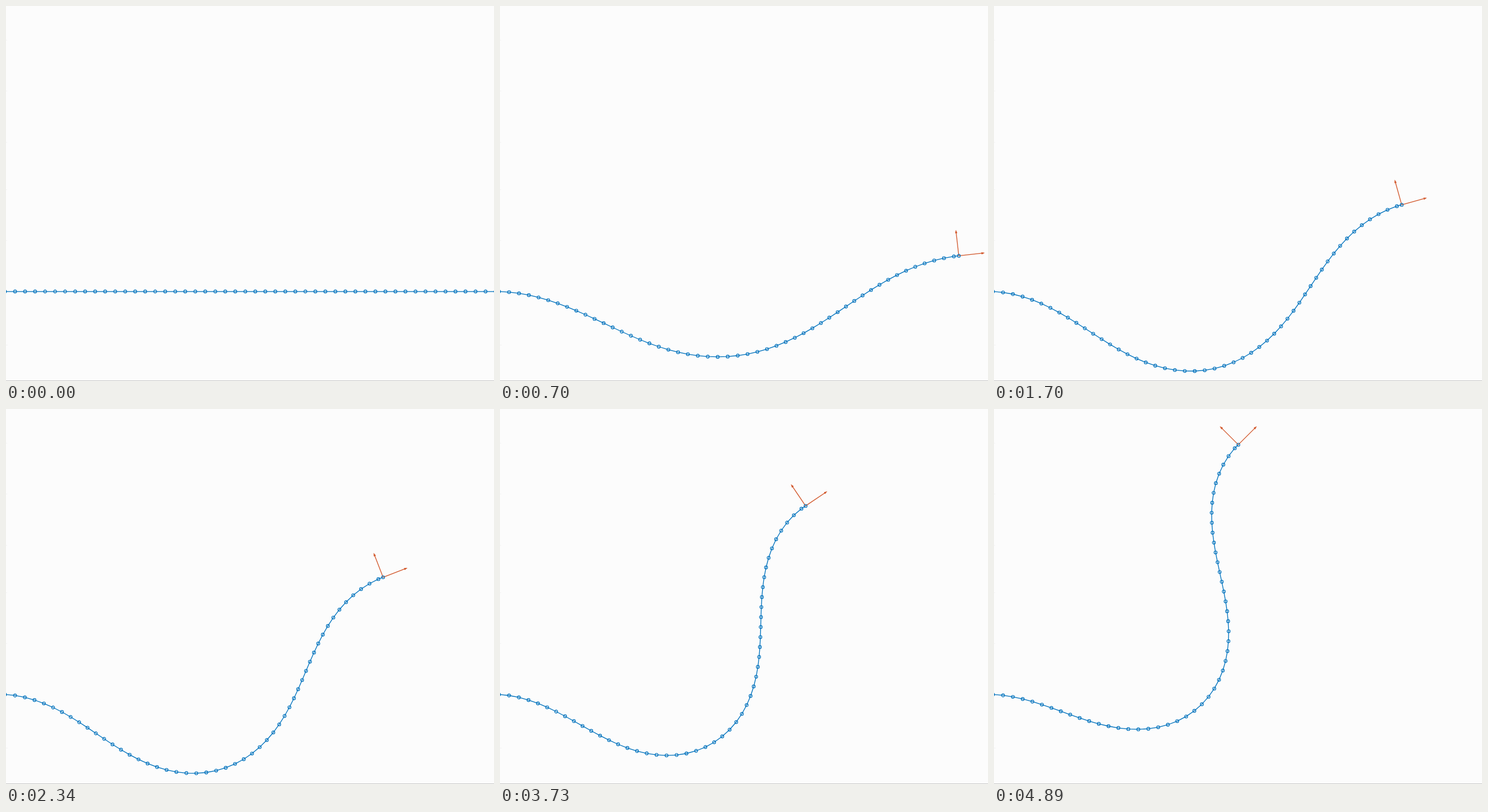
These frames come from a looping animation (834x642 px, 4.96 s). An HTML page:

```html
<!DOCTYPE html>
<html lang="en">
<head>
<meta charset="utf-8">
<title>Elastic rod</title>
<style>
html, body { margin: 0; width: 100%; height: 100%; overflow: hidden; background: #fcfcfc; }
svg { display: block; width: 834px; height: 642px; }
</style>
</head>
<body>
<svg viewBox="0 0 834 642" fill="none">
  <path d="M0 58.5h2M0 145.5h2M0 233.5h2M0 314.5h2M0 401.5h2M0 580.5h3" stroke="#f3f3f3"/>
  <rect y="641" width="834" height="1" fill="#c9c9c9"/>
  <path id="axes" stroke="#d2582c" stroke-width="1.3"/>
  <path id="rod" stroke="#0072bd" stroke-width="1.3"/>
  <path id="dots" stroke="#0072bd" stroke-width="1.15"/>
</svg>
<script>
const LOOP = 4960, N = 50, LINK = 17.106, BASE = [-10.15, 488.8];
const STEPS = 49, DOT = 2.6, ARROW = 2.5 * LINK;
const times = [
  160, 230, 310, 380, 550, 620, 700, 860, 930, 1010, 1080, 1230, 1310, 1400,
  1560, 1630, 1700, 1790, 1940, 2020, 2110, 2250, 2340, 2410, 2480,
  2650, 2720, 2810, 2890, 3050, 3110, 3200, 3340, 3420, 3490, 3560,
  3730, 3790, 3870, 3950, 4100, 4190, 4280, 4420, 4500, 4570, 4650, 4800, 4890
];

// Gaussian elimination with pivoting; rows carry the right-hand side last
function solve(m) {
  const n = m.length;
  for (let c = 0; c < n; c++) {
    let p = c;
    for (let r = c + 1; r < n; r++) if (Math.abs(m[r][c]) > Math.abs(m[p][c])) p = r;
    [m[c], m[p]] = [m[p], m[c]];
    for (let r = c + 1; r < n; r++) {
      const f = m[r][c] / m[c][c];
      if (f) for (let k = c; k <= n; k++) m[r][k] -= f * m[c][k];
    }
  }
  const x = new Array(n);
  for (let r = n - 1; r >= 0; r--) {
    let s = m[r][n];
    for (let k = r + 1; k < n; k++) s -= m[r][k] * x[k];
    x[r] = s / m[r][r];
  }
  return x;
}

// Link angles of least bending energy with the tip pose held;
// the last two unknowns are the tip forces.
function relax(u, X, Y, tip) {
  const n = N - 1;
  for (let it = 0; it < 40; it++) {
    const m = Array.from({ length: n + 2 }, () => new Array(n + 3).fill(0));
    const P = u[n], Q = u[n + 1];
    let sx = -X, sy = -Y;
    for (let i = 0; i < n; i++) {
      const c = Math.cos(u[i]), s = Math.sin(u[i]);
      const before = i ? u[i - 1] : 0, after = i < n - 1 ? u[i + 1] : tip;
      m[i][i] = 2 + P * c + Q * s;
      if (i) m[i][i - 1] = -1;
      if (i < n - 1) m[i][i + 1] = -1;
      m[i][n] = s;
      m[i][n + 1] = -c;
      m[i][n + 2] = before + after - 2 * u[i] - P * s + Q * c;
      m[n][i] = -s;
      m[n + 1][i] = c;
      sx += c;
      sy += s;
    }
    m[n][n + 2] = -sx;
    m[n + 1][n + 2] = -sy;
    const d = solve(m);
    u = u.map((v, i) => v + d[i]);
    if (Math.max(...d.map(Math.abs)) < 1e-9) break;
  }
  return u;
}

function buildPoses() {
  const w = 2 * Math.PI / N;
  const poses = [{ tip: 0, angles: new Array(N - 1).fill(0) }];
  let u = Array.from({ length: N - 1 }, (_, i) =>
    -0.2 * Math.sin(w * (i + 1)) + 0.01 * (1 - Math.cos(w * (i + 1))));
  u.push(-w * w, 0);
  for (let k = 1; k <= STEPS; k++) {
    const f = k / STEPS, tip = f * Math.PI / 4, shift = f * N / 2;
    u = relax(u, N - shift - 0.5 - Math.cos(tip) / 2, shift - Math.sin(tip) / 2, tip);
    poses.push({ tip, angles: u.slice(0, N - 1) });
  }
  return poses;
}

const move = ([x, y], a, r) => [x + r * Math.cos(a), y - r * Math.sin(a)];
const at = p => p[0].toFixed(2) + ' ' + p[1].toFixed(2);

function arrow(p, a) {
  const end = move(p, a, ARROW);
  const barb = side => at(move(end, a + Math.PI + side * 0.33, 4));
  return `M${at(p)}L${at(end)}M${barb(1)}L${at(end)}L${barb(-1)}`;
}

function drawing({ tip, angles }) {
  const pts = [BASE, move(BASE, 0, LINK / 2)];
  angles.forEach(a => pts.push(move(pts[pts.length - 1], a, LINK)));
  const end = move(pts[pts.length - 1], tip, LINK / 2);
  pts.push(end);
  const ring = ([x, y]) =>
    `M${at([x - DOT, y])}a${DOT} ${DOT} 0 1 0 ${2 * DOT} 0a${DOT} ${DOT} 0 1 0 ${-2 * DOT} 0`;
  return {
    rod: 'M' + pts.map(at).join('L'),
    dots: pts.map(ring).join(''),
    axes: arrow(end, tip) + arrow(end, tip + Math.PI / 2)
  };
}

const frames = buildPoses().map(drawing);
const parts = ['rod', 'dots', 'axes'].map(id => [id, document.getElementById(id)]);
let shown = -1;

function render(ms) {
  const t = ms % LOOP;
  const k = times.filter(v => v <= t).length;
  if (k === shown) return;
  shown = k;
  for (const [id, el] of parts) el.setAttribute('d', frames[k][id]);
}

const start = performance.now();
function tick() {
  render(performance.now() - start);
  requestAnimationFrame(tick);
}
tick();
</script>
</body>
</html>
```
